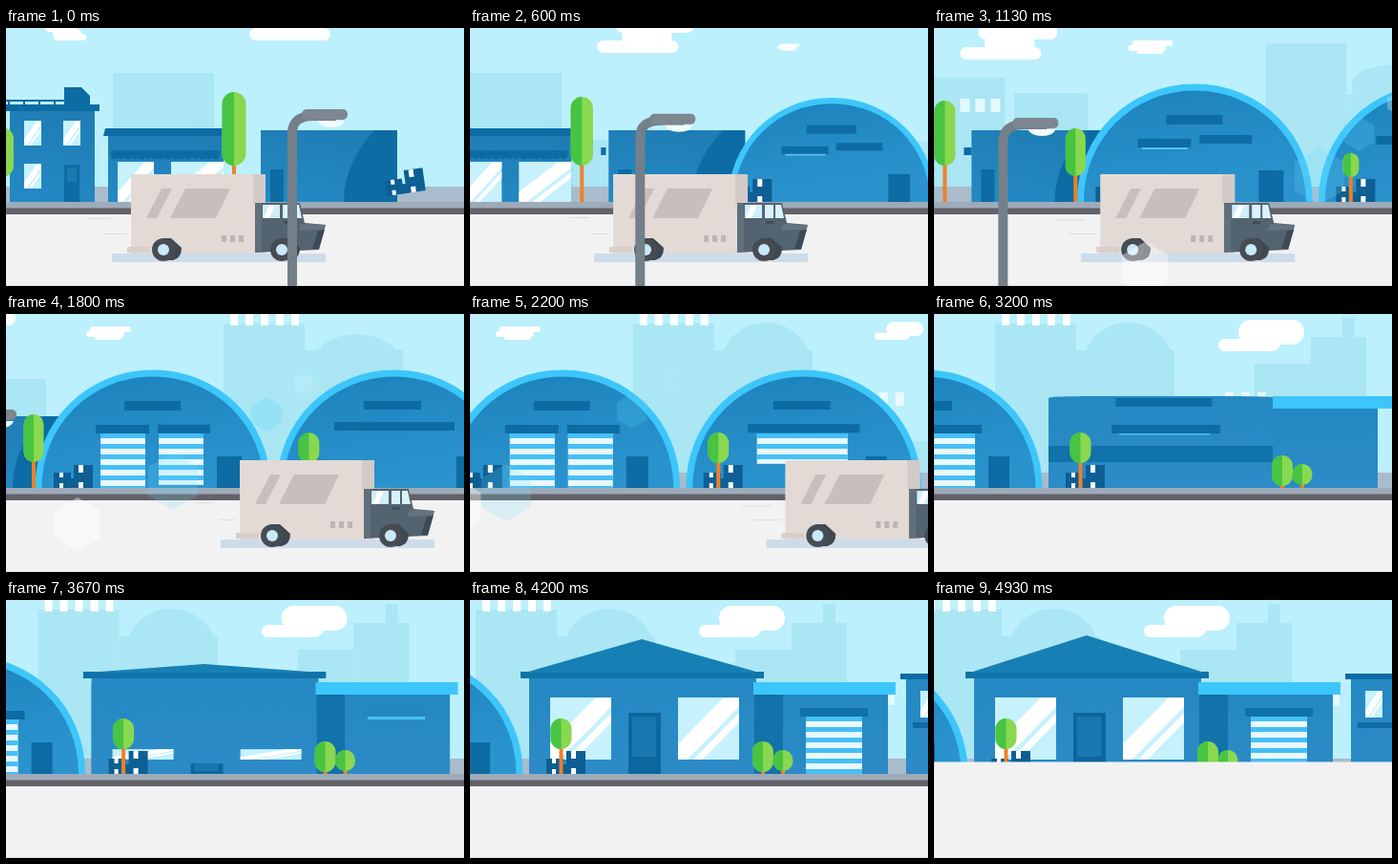
These frames come from a looping animation (480x270 px, 4990 ms). An HTML page:

```html
<!DOCTYPE html>
<html lang="en">
<head>
<meta charset="utf-8">
<title>Delivery truck</title>
<style>
html, body { margin: 0; width: 100%; height: 100%; overflow: hidden; background: #f2f2f2; }
svg { display: block; width: 100vw; height: 100vh; }
</style>
</head>
<body>
<svg viewBox="0 0 480 270">
  <defs>
    <linearGradient id="dome" x1="0" y1="0" x2="0.3" y2="1">
      <stop offset="0" stop-color="#1c82bb"/><stop offset="1" stop-color="#2a93ce"/>
    </linearGradient>
    <linearGradient id="wall" x1="0" y1="0" x2="0" y2="1">
      <stop offset="0" stop-color="#2488c3"/><stop offset="1" stop-color="#2c8bc7"/>
    </linearGradient>
    <linearGradient id="old" x1="0.6" y1="0" x2="0.3" y2="1">
      <stop offset="0" stop-color="#1f7db4"/><stop offset="1" stop-color="#2389c4"/>
    </linearGradient>
    <clipPath id="depot"><rect x="-244" y="107" width="143" height="75"/></clipPath>
    <clipPath id="land"><rect x="-700" y="-20" width="1500" height="202"/></clipPath>
  </defs>
  <g id="scene"></g>
</svg>
<script>
const LOOP = 4990, STEP = 66.667, BASE = 182;
const DARK = '#0c6ca3', LIGHT = '#3dc6fb', PALE = '#aae6f3', GLASS = '#e9f9ff', BOX = '#0d5f94';
const scene = document.getElementById('scene');

const mix = (a, b, p) => a + (b - a) * p;
const clamp = p => Math.max(0, Math.min(1, p));
const ease = (t, from, to) => { const p = clamp((t - from) / (to - from)); return p * p * (3 - 2 * p); };

// Smooth curve through [time, value] points.
function curve(t, pts) {
  const last = pts.length - 1;
  const slope = i => {
    const a = pts[Math.max(0, i - 1)], b = pts[Math.min(last, i + 1)];
    return (b[1] - a[1]) / (b[0] - a[0]);
  };
  let i = 0;
  while (i < last - 1 && t > pts[i + 1][0]) i++;
  const [t0, v0] = pts[i], [t1, v1] = pts[i + 1], h = t1 - t0, p = clamp((t - t0) / h);
  const q = p * p * (3 - 2 * p);
  return mix(v0, v1, q) + h * (slope(i) * p * (1 - p) ** 2 - slope(i + 1) * p * p * (1 - p));
}

const rect = (x, y, w, h, fill, rx = 0) =>
  `<rect x="${x}" y="${y}" width="${Math.max(0, w)}" height="${Math.max(0, h)}" rx="${rx}" fill="${fill}"/>`;
const poly = (points, fill) => `<polygon points="${points}" fill="${fill}"/>`;
const path = (d, fill, extra = '') => `<path d="${d}" fill="${fill}" ${extra}/>`;
const circle = (x, y, r, fill) => `<circle cx="${x}" cy="${y}" r="${r}" fill="${fill}"/>`;
const move = (x, y, body, extra = '') => `<g transform="translate(${x} ${y}) ${extra}">${body}</g>`;
const fade = (o, body) => o > 0 ? `<g opacity="${o}">${body}</g>` : '';
const grow = (x, s, body) => s > 0 ? move(x, BASE, move(-x, -BASE, body), `scale(${s})`) : '';
const block = (x, right, top, s = 1) => rect(x, BASE - (BASE - top) * s, right - x, (BASE - top) * s, PALE);
const ring = width => `stroke="${LIGHT}" stroke-width="${width}" clip-path="url(#land)"`;

function tree(x, w, top, bottom, s = 1) {
  const r = w / 2, h = bottom - top - w;
  return grow(x, s, rect(x - 2, bottom - 12, 4, BASE - bottom + 12, '#ef8127') +
    path(`M${x - r} ${top + r}a${r} ${r} 0 0 1 ${w} 0v${h}a${r} ${r} 0 0 1 ${-w} 0z`, '#89d84f') +
    path(`M${x} ${top}a${r} ${r} 0 0 0 ${-r} ${r}v${h}a${r} ${r} 0 0 0 ${r} ${r}z`, '#48c342'));
}

function boxes(x) {
  return rect(x, 166, 18, 16, BOX) + rect(x + 21, 158, 20, 24, BOX) + rect(x + 12, 172, 12, 10, BOX) +
    rect(x + 6, 166, 4, 5, '#fff') + rect(x + 6, 177, 4, 5, '#fff') +
    rect(x + 26, 158, 5, 8, '#fff') + rect(x + 26, 176, 5, 6, '#fff');
}

function shutter(x, y, w, open) {
  const h = (BASE - y) * open;
  let out = rect(x, y, w, h, GLASS);
  for (let s = 0; s < h; s += 11) out += rect(x, y + s, w, Math.min(5, h - s), '#45bff6');
  return out;
}

function glass(x, y, w, h) {
  const band = pts => poly(pts.map(([u, v]) => `${x + w * u},${y + h * v}`).join(' '), '#fff');
  return rect(x, y, w, h, '#c6f1fd') +
    band([[0, .75], [.75, 0], [1, 0], [1, .15], [.15, 1], [0, 1]]) +
    band([[.25, 1], [1, .25], [1, .4], [.4, 1]]);
}

function backdrop(t) {
  const early = ease(t, 300, 900), tall = ease(t, 500, 2000), round = ease(t, 1300, 2200), late = ease(t, 1700, 2900);
  let out = block(-399, -293, 47);
  out += block(-284, -209, 52, early) + block(-199, -122, 68, early);
  if (early > .9) for (let i = 0; i < 3; i++) out += rect(-256 + i * 16, 74, 10, 14, '#e4f9fe');
  out += block(64, 149, mix(20, 10, tall), ease(t, 300, 1000)) + block(149, 252, mix(70, 38, ease(t, 1100, 1800)));
  out += path(`M155 182V57a48.5 ${mix(19, 48, round)} 0 0 1 97 0V182z`, PALE);
  for (let i = 0; i < 5; i++) out += rect(71 + i * 16, mix(-14, 0, ease(t, 1200, 1800)), 8, 12, '#fff');
  out += block(336, 395, 52, late) + block(395, 453, 24, late) + block(428, 441, 4, late);
  if (t > 2200 && t < 3900) for (let i = 0; i < 3; i++) out += rect(305 + i * 17, 82, 9, 14, '#e9faff');
  return out;
}

function clouds(t) {
  const layer = (x, y, w, h) => rect(x, y, w, h, '#fff', h / 2);
  const drop = mix(-20, 0, ease(t, 0, 1000));
  const small = layer(-22, -7, 43, 6) + layer(-26, -2, 40, 6) + layer(-17, 2, 28, 5);
  const large = layer(-24, -17, 69, 26) + layer(-45, 3, 53, 13) + layer(-18, -6, 39, 22);
  return layer(-471, -8, 36, 12) + layer(-462, 1, 30, 9) + layer(-461, 6, 34, 7) +
    move(0, drop, layer(-256, 20, 85, 13) + layer(-237, -3, 83, 15) + rect(-230, 9, 52, 14, '#fff')) +
    move(-54, 20, small, `scale(${ease(t, 300, 900)})`) +
    move(343, mix(18, 23, ease(t, 2500, 3100)), large, `scale(${ease(t, 1900, 2450)})`);
}

function oldStreet(t) {
  let house = poly('-450,62 -432,62 -423,71 -423,80 -450,80', DARK) +
    rect(-507, 86, 89, 96, 'url(#old)') + rect(-511, 80, 98, 7, DARK) + rect(-511, 75, 85, 2, DARK);
  for (let i = 0; i < 6; i++) house += rect(-509 + i * 16, 75, 2, 6, DARK);
  for (const [x, y] of [[-492, 97], [-451, 97], [-492, 142]]) house += glass(x, y, 18, 26);
  house += rect(-450, 143, 16, 39, DARK) + rect(-447, 147, 10, 14, '#1c7ab1');
  let shop = rect(-404, 111, 121, 71, 'url(#old)') + poly('-407,105 -283,105 -283,113 -409,113', DARK) +
    glass(-394, 140, 38, 42) + glass(-338, 140, 55, 42) + rect(-401, 128, 114, 6, DARK);
  for (let i = 0; i < 16; i++) shop += circle(-397.5 + i * 7.1, 134, 3.5, DARK);
  return house + shop + rect(-244, 107, 143, 75, 'url(#old)') +
    `<ellipse cx="-12" cy="182" rx="145" ry="118" fill="${DARK}" clip-path="url(#depot)"/>` +
    rect(-234, 148, 14, 34, DARK) + rect(-252, 125, 8 * ease(t, 300, 800), 8, DARK);
}

function fallingBoxes(t) {
  const fall = 1 - ease(t, 0, 270);
  return move(-94 + 2 * fall, 182 - 9 * fall, move(94, -182, boxes(-114)), `rotate(${-8 * fall})`);
}

const arch = x => `M${x - 120} 182C${x - 120} 114 ${x - 67} 62 ${x} 62S${x + 120} 114 ${x + 120} 182`;

function firstDome(t) {
  const left = ease(t, 1130, 1700), right = ease(t, 1200, 1900);
  return grow(-10, ease(t, 50, 750), path(arch(-10), 'url(#dome)', ring(7)) +
    rect(-40, 91, 59, 10, DARK) + shutter(-65, 125, 47, Math.max(.03, left)) +
    shutter(-4, 125, 47, right) + rect(-70, 116, 56, 9, DARK) +
    rect(-5, mix(112, 116, right), 55, 9, DARK) + rect(57, 149, 22 + 4 * (1 - ease(t, 1800, 2400)), 33, DARK));
}

function changingHouse(t) {
  const p = ease(t, 2640, 3150), top = mix(62, 86, p), mid = mix(243, 239, p);
  const span = mix(120, 119, p), crown = mix(66, 117, p), shoulder = mix(182, 89, p), pull = mix(114, 86, p);
  const shape = `M${mid - span} 182V${shoulder}C${mid - span} ${pull} ${mid - crown} ${top} ${mid} ${top}` +
    `S${mid + span} ${pull} ${mid + span} ${shoulder}V182`;
  let out = path(shape, p > .9 ? 'url(#wall)' : 'url(#dome)', p < 1 ? ring(7 * (1 - p)) : '');
  if (t < 3480) {
    const narrow = ease(t, 1800, 2400), wide = mix(126, 114, narrow), title = mix(60, 101, p);
    const open = ease(t, 1850, 2500) * (1 - ease(t, 2640, 3100));
    out += shutter(194, 125, 95, Math.max(t > 2400 ? .02 : 0, open)) +
      rect(243 - wide / 2, mix(113, 116, narrow), wide, 9, DARK) +
      rect(241 - title / 2, mix(91, 88, p), title, 9, DARK) +
      fade(1 - p, rect(308, 149, 22, 33, DARK));
  }
  const lift = curve(t, [[2850, 182], [3200, 138], [3650, 75]]);
  const win = ease(t, 3550, 4000), eave = 9 * ease(t, 3400, 3700);
  if (lift < 86) out += rect(120, lift, 238, BASE - lift, 'url(#wall)');
  if (win > 0) {
    const h = 65 * win;
    out += glass(142, 167 - h, 64, h) + glass(276, 167 - h, 64, h) +
      rect(224, BASE - 64 * win, 34, 64 * win, '#0d669d') + rect(228, BASE - 60 * win, 25, 42 * win, '#1878af');
  }
  if (t > 2850) {
    const peak = 35 * ease(t, 3500, 4000) + 4 * ease(t, 4200, 4933);
    out += rect(120 - eave, lift, 237 + eave * 2, Math.min(mix(17, 7, ease(t, 3200, 3650)), BASE - lift), '#1073a9') +
      poly(`${120 - eave / 2},${lift + 1} 238,${lift + 1 - peak} ${357 + eave / 2},${lift + 1}`, '#1680b4');
  }
  return grow(mid, ease(t, 500, 1050), out);
}

function garage(t) {
  const slide = 31 * ease(t, 3200, 3700), open = ease(t, 3600, 4100);
  return grow(425, ease(t, 2650, 3050), rect(356, 98, 60, 84, '#1272aa') +
    rect(355 + slide, 98, 110, 84, 'url(#wall)') + rect(355, 86, 149, 13, LIGHT) +
    fade(open, rect(496, 99, 7, 11, '#e4f8ff') + rect(404, 113, 71, 9, '#0f71a9')) +
    shutter(410, 122, 59, open));
}

function lastHouse(t) {
  return grow(545, ease(t, 3300, 3900), rect(515, 82, 80, 100, 'url(#wall)') + rect(509, 77, 90, 6, DARK) +
    glass(530, 95, 18, 28) + rect(522, 128, 70, 6, DARK));
}

function lamp(t) {
  const y = curve(t, [[0, 0], [1130, 9], [1800, 15], [2600, 17]]);
  return move(-211, y, rect(-5, 106, 10, 180, '#737f89') +
    `<path d="M0 110Q0 92 22 92H46" fill="none" stroke="#737f89" stroke-width="10"/>` +
    rect(10, 85, 48, 11, '#7c8790', 5) + path('M26 97h29q-2 7-14 7t-15-7z', '#f4fbff'));
}

function truck(x, t) {
  const wheel = cx => path(`M${cx} 220h8l11 10q0 11-9 13h-10z`, '#3f4851') +
    circle(cx, 232, 12, '#474c53') + circle(cx, 232, 6, '#c8eafa');
  const trail = 7 * Math.sin(t / 160);
  return move(x, 0, rect(-20, 236, 224, 9, '#cddcea') +
    rect(-46, 199 + trail / 4, 25 + trail, 1, '#dddddf') + rect(-28 - trail, 215, 24 + trail, 1, '#dddddf') +
    rect(0, 153, 141, 83, '#e3dad6') + rect(128, 153, 13, 31, '#d3cac7') +
    rect(-4, 229, 24, 6, '#d8cfcb') +
    poly('16,199 32,168 43,168 27,199', '#c8bfbc') + poly('41,199 57,168 104,168 89,199', '#c8bfbc') +
    [95, 104, 113].map(d => rect(d, 217, 5, 7, '#beb5b2')).join('') +
    poly('130,183 177,183 182,204 204,206 197,232 130,235', '#53636f') +
    rect(130, 183, 7, 51, '#60707b') + poly('178,205 204,206 202,211 176,212', '#64747f') +
    poly('196,212 203,211 197,231 190,231', '#3d4954') +
    rect(138, 185, 18, 14, '#cfeefb') + poly('145,185 151,185 145,199 139,199', '#fff') +
    rect(159, 185, 9, 14, '#d9f3fc') + poly('170,185 176,185 179,199 170,199', '#d9f3fc') +
    rect(160, 202, 8, 3, '#414d59') + wheel(34) + wheel(158));
}

function flares(t) {
  const hex = (x, y, r, fill, o) => {
    const pts = Array.from({ length: 6 }, (_, i) =>
      `${x + r * Math.sin(i * Math.PI / 3)},${y + r * Math.cos(i * Math.PI / 3)}`).join(' ');
    return fade(o, poly(pts, fill));
  };
  const p = (t - 1130) / 670, q = (t - 1800) / 800;
  const shown = ease(t, 850, 1130) * (1 - ease(t, 2600, 2900));
  return hex(222 - 147 * p, 252 - 32 * p, 28, '#ffffff', .4 * shown) +
    hex(405 - 230 * p, 155 + 20 * p, 30, '#6fd8fb', .2 * shown) +
    hex(273 - 207 * q, 105 - 7 * q, 18, '#54d0f8', .24 * shown) +
    hex(312 - 207 * q, 73 - 7 * q, 11, '#c8f4fd', .35 * shown * (1 - ease(t, 1800, 2500)));
}

function draw(t) {
  const cam = curve(t, [[0, 511], [1130, 284], [1800, 164], [2600, 57], [3200, 0], [4200, -58], [4933, -78]]);
  const truckX = curve(t, [[0, 131], [1130, 174], [1800, 245], [2600, 433], [3000, 560]]);
  const wipe = 270 - (t - 4330) / 6;
  const shrink = ease(t, 0, 1100), stretch = ease(t, 1050, 1900);
  const trees = tree(-515, 24, 104, 156) +
    tree(-272, mix(25, 22, shrink), mix(67, 76, shrink), 144) +
    tree(-135, 21, 105, 155, ease(t, 400, 950)) +
    tree(153.5, mix(17, 22, stretch), mix(131, 124, stretch), 156, ease(t, 700, 1100)) +
    tree(365, 22, 148, 180, ease(t, 2250, 2550)) + tree(386, 21, 157, 179, ease(t, 2500, 2850));
  scene.innerHTML =
    rect(0, 0, 480, 270, '#bcf0fd') +
    move(cam, 0, backdrop(t) + clouds(t)) +
    rect(0, 166, 480, 16, '#a9bccb') +
    move(cam, 0, oldStreet(t) + changingHouse(t) + firstDome(t) + garage(t) + lastHouse(t)) +
    rect(0, 182, 480, 7, '#9eabb9') + rect(0, 188.5, 480, 6.5, '#636268') +
    rect(0, 195, 480, 75, '#f2f2f2') + rect(0, 269, 480, 1, '#dce8f1') +
    move(cam, 0, fallingBoxes(t) + grow(158, ease(t, 750, 1100), boxes(138)) + trees) +
    (t < 3000 ? truck(truckX, t) : '') +
    move(cam, 0, lamp(t)) + flares(t) +
    (t > 4330 ? rect(0, wipe, 480, 270 - wipe, '#f2f2f2') : '');
}

const start = performance.now();
function tick() {
  const now = (performance.now() - start) % LOOP;
  draw(Math.floor((now + 4) / 66.6) * STEP);
  requestAnimationFrame(tick);
}
tick();
</script>
</body>
</html>
```
